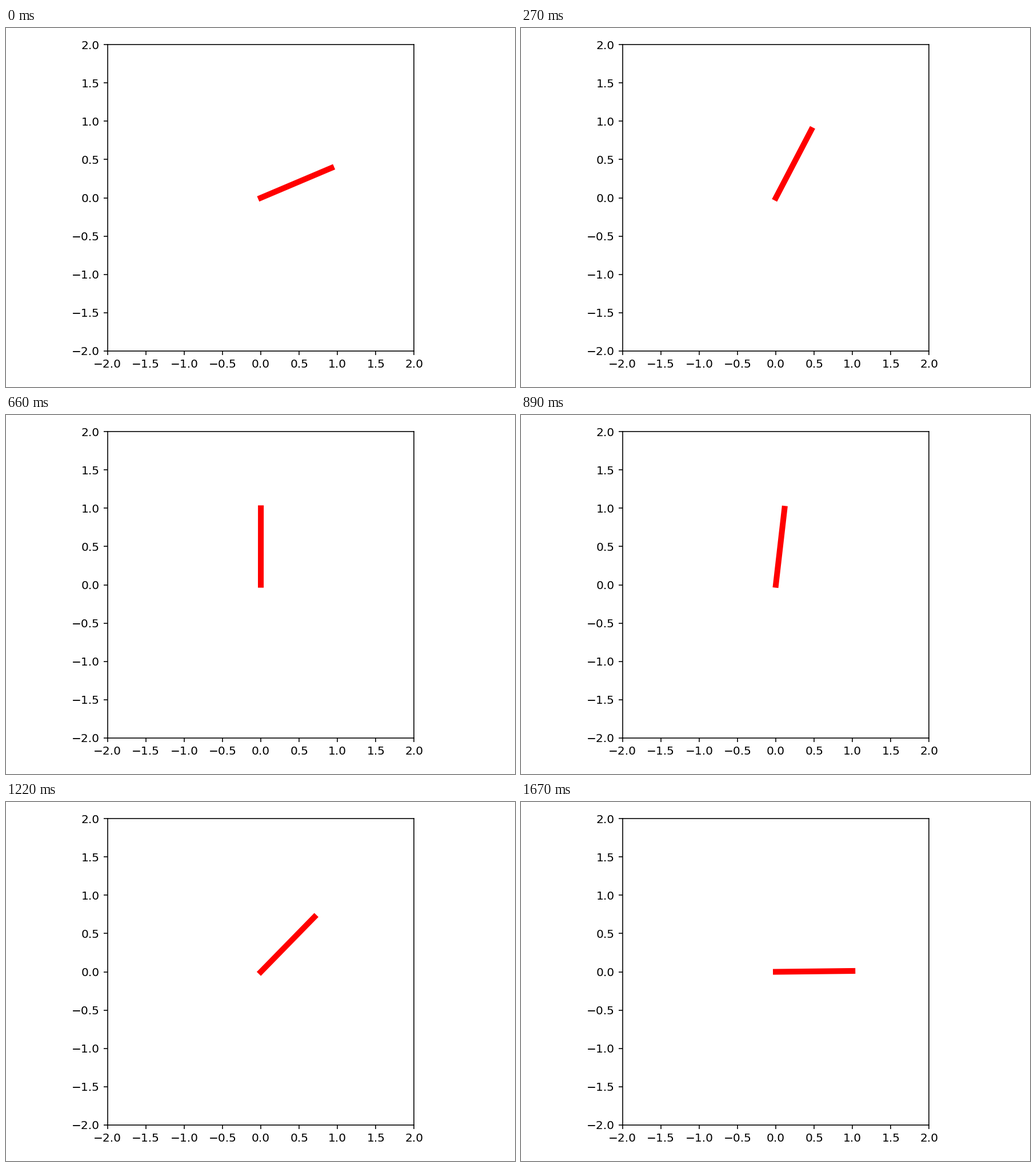
Recreate the animation shown at these times as a matplotlib script. Size 891 by 629 pixels, loop 1700 ms.

```python
import numpy as np
import matplotlib.pyplot as plt
from matplotlib.animation import FuncAnimation

W, H, DPI = 891, 629, 145
LOOP_MS, TICK_MS = 1700, 10
LEFT, BOTTOM, SIDE = 177.7, 63.1, 536.7


def arm_angle(ms):
    """Angle in radians of a stepped sine swing between 0 and 90 degrees."""
    # The steps come more slowly around the top of the swing.
    step = np.floor(np.interp(ms, [0, 600, 890, LOOP_MS], [0, 20.5, 26, 51]))
    return np.pi / 4 * (1 + np.sin(np.radians(5.79 * step - 29.3)))


plt.rcParams.update({"font.family": "DejaVu Sans", "font.size": 10})
# The small margin keeps the pixel size from rounding down.
fig = plt.figure(figsize=((W + 0.01) / DPI, (H + 0.01) / DPI), dpi=DPI,
                 facecolor="white")
ax = fig.add_axes([LEFT / W, BOTTOM / H, SIDE / W, SIDE / H])
ticks = np.arange(-2, 2.1, 0.5)
ax.set(xlim=(-2, 2), ylim=(-2, 2), xticks=ticks, yticks=ticks)
arm, = ax.plot([], [], color="red", lw=5)


def draw(i):
    a = arm_angle(i * TICK_MS)
    arm.set_data([0, np.cos(a)], [0, np.sin(a)])
    return arm,


anim = FuncAnimation(fig, draw, frames=LOOP_MS // TICK_MS, interval=TICK_MS,
                     init_func=lambda: draw(0), repeat=True, repeat_delay=0)
plt.show()
```
